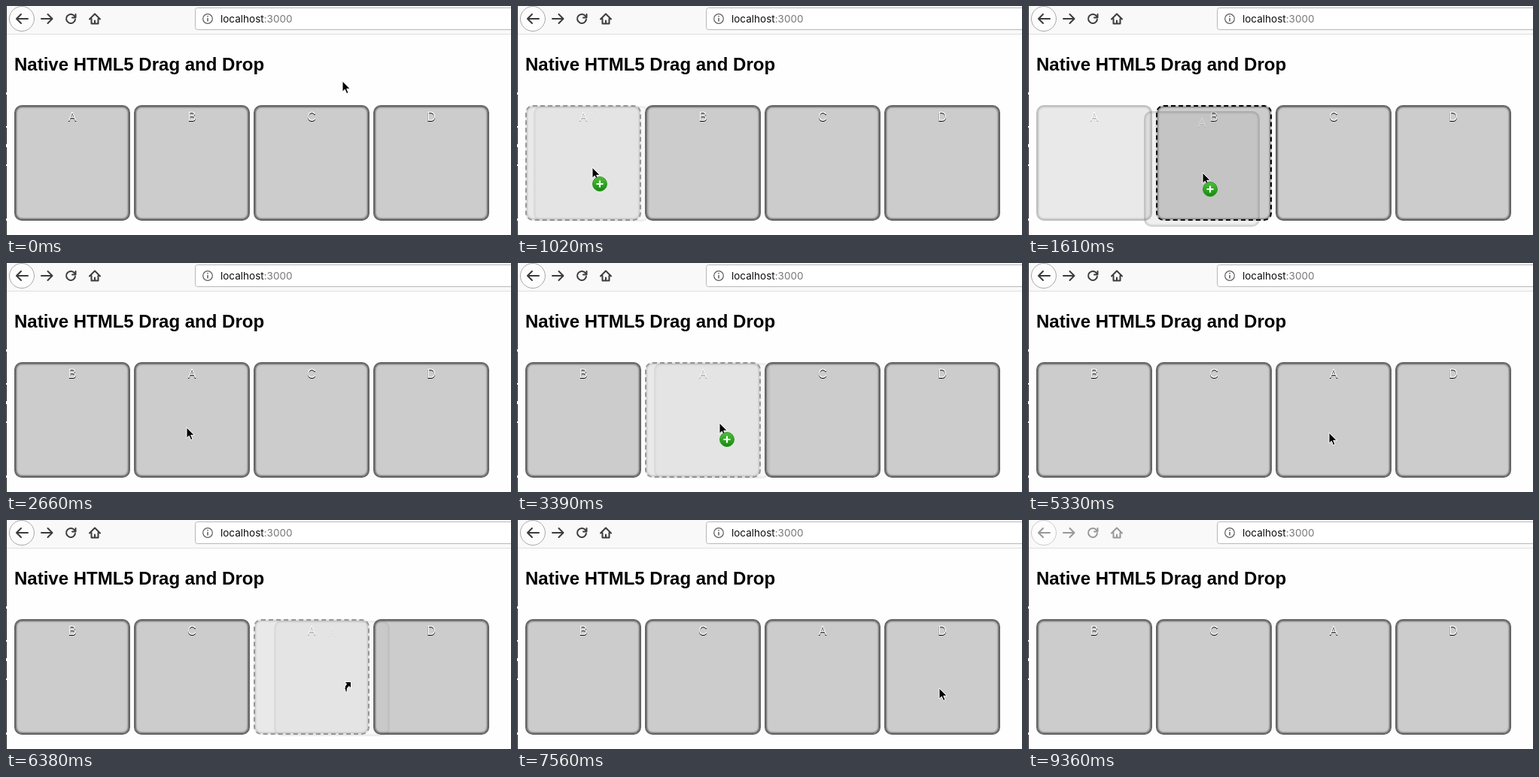
These frames come from a looping animation (671 px wide and 305 px high, 9.46 s). An HTML page:

```html
<!DOCTYPE html>
<html lang="en">
<head>
<meta charset="utf-8">
<title>Drag and drop</title>
<style>
  html, body { margin: 0; width: 100%; height: 100%; overflow: hidden; background: #fefefe; }
  svg { position: absolute; left: 0; top: 0; }
  .title { font: bold 24px "Liberation Sans", Arial, sans-serif; }
  .url { font: 13.5px Inter, sans-serif; fill: #0c0c0d; }
  .icons { fill: none; stroke: #3b3b3d; stroke-width: 2; stroke-linecap: round; stroke-linejoin: round; }
  .icons .ring { stroke: #a9a9ab; stroke-width: 1; fill: #fdfdfd; }
  .inactive .icons { stroke: #98989a; }
  .inactive .icons .ring { stroke: #cbcbcc; }
  .box {
    position: absolute; top: 132px; width: 154px; height: 154px; box-sizing: border-box;
    padding-top: 5px; border: 2px solid #666; border-radius: 10px;
    background: #ccc; box-shadow: inset 0 0 3px #000;
    font: 16px/18px "Liberation Sans", Arial, sans-serif; text-align: center;
    color: #fff; text-shadow: 0 1px #000;
  }
  .dim { opacity: .4; }
  .over { border: 2px dashed #000; }
  .ghost {
    background: rgba(150, 150, 150, .13); border-color: rgba(60, 60, 60, .16);
    box-shadow: inset 0 0 3px rgba(0, 0, 0, .2);
    color: rgba(255, 255, 255, .4); text-shadow: 0 1px rgba(0, 0, 0, .1);
  }
</style>
</head>
<body>
<svg width="671" height="305">
  <rect width="671" height="37" fill="#f9f9fa"/>
  <path d="M0 37.5H671" stroke="#e0e0e1"/>
  <rect x="251.5" y="2.5" width="440" height="29" rx="3" fill="#fff" stroke="#b8b8ba"/>
  <g class="icons">
    <circle class="ring" cx="21" cy="17" r="16.5"/>
    <path d="M29 17H14M20 11L14 17L20 23"/>
    <path d="M47 17H61M55.5 11L61.5 17L55.5 23"/>
    <path d="M91 13.5A6 6 0 1 0 92 18M92.5 11V15.5H88"/>
    <path d="M111 17.5L118 10.5L125 17.5M113.5 17V23.5H122.5V17M118 23V19.5"/>
  </g>
  <g fill="none" stroke="#5c5c5e">
    <circle cx="268" cy="17" r="6.3" stroke-width="1.2"/>
    <path d="M268 16V20.5M268 13V14.5" stroke-width="1.5"/>
  </g>
  <text class="url" x="285" y="22">localhost<tspan fill="#77777a">:3000</tspan></text>
  <text class="title" x="11" y="86">Native HTML5 Drag and Drop</text>
  <path d="M.5 0V305" stroke="#2a2a2c" stroke-dasharray="115 3 42 2 22 4 23 2 70 3"/>
</svg>
<div id="boxes"></div>
<svg width="671" height="305">
  <g id="cursor" stroke="#fff" stroke-linejoin="round">
    <path id="arrow" d="M0 0V14.2L3.3 11.2L5.6 16.6L8 15.6L5.7 10.3H10.2Z"/>
    <path id="link" d="M4 -1.5H12.5V7L9.8 4.5Q6 7 7.5 13.5Q1 7.5 6.6 1.4Z"/>
    <g id="plus">
      <circle cx="10" cy="22" r="9.5" fill="url(#green)" stroke="#1c8a12" stroke-width=".8"/>
      <path d="M5.5 22H14.5M10 17.5V26.5" stroke-width="2.2"/>
    </g>
  </g>
  <linearGradient id="green" x2="0" y2="1">
    <stop stop-color="#4fc03c"/><stop offset="1" stop-color="#138c0b"/>
  </linearGradient>
</svg>
<script>
const LOOP = 9460, STEP = 145, LEFT = 11, PITCH = 159;
const $ = id => document.getElementById(id);

// Each move goes from the last resting point to (x, y), through the fractions in p.
const moves = [
  { at: 0, x: 447, y: 100, p: [1] },
  { at: 140, x: 89, y: 214, p: [.25, .8, 1.053, 1] },
  { at: 1020, x: 232, y: 222, p: [.08, .3, .62, .88, 1] },
  { at: 2660, x: 257, y: 212, p: [.3, .8, 1] },
  { at: 3390, x: 400, y: 226, p: [.085, .3, .62, .88, 1] },
  { at: 5630, x: 419, y: 215, p: [.3, .8, 1] },
  { at: 6380, x: 561, y: 224, p: [.19, .5, .83, 1] },
  { at: 8610, x: 585, y: 264, p: [1] }
];
const drags = [
  { from: 1020, drop: 2210, end: 2210, slot: 0 },
  { from: 3390, drop: 5330, end: 5330, slot: 1 },
  { from: 6380, drop: 7270, end: 7560, slot: 2, rejected: true }
];

function addBox(cls) {
  const el = document.createElement("div");
  el.className = cls;
  return $("boxes").appendChild(el);
}
const boxes = [0, 1, 2, 3].map(i => {
  const el = addBox("box");
  el.style.left = LEFT + i * PITCH + "px";
  return el;
});
const ghost = addBox("box ghost");
ghost.textContent = "A";

function pointer(t) {
  const n = moves.findLastIndex(m => t >= m.at);
  const m = moves[n], start = moves[n - 1] || m;
  const step = Math.min(m.p.length - 1, Math.floor((t - m.at) / STEP));
  const p = m.p[step];
  return {
    step, start,
    x: start.x + (m.x - start.x) * p,
    y: start.y + (m.y - start.y) * Math.min(p, 1)
  };
}

function draw(t) {
  const mouse = pointer(t);
  const drag = drags.find(d => t >= d.from && t < d.end);
  const held = drag && t < drag.drop;
  const over = held ? Math.floor((mouse.x - LEFT) / PITCH) : -1;
  const order = t < 2210 ? "ABCD" : t < 5330 ? "BACD" : "BCAD";

  boxes.forEach((el, i) => {
    el.textContent = order[i];
    el.classList.toggle("dim", !!drag && drag.slot === i);
    el.classList.toggle("over", over === i);
  });

  ghost.hidden = !drag;
  ghost.style.display = drag ? "" : "none";
  if (drag) {
    // A rejected drop sends the ghost back to its slot.
    const back = held ? 1 : t - drag.drop < STEP ? .6 : .15;
    const dx = (mouse.x - mouse.start.x) * back;
    const dy = (mouse.y - mouse.start.y) * back;
    ghost.style.left = LEFT + drag.slot * PITCH + "px";
    ghost.style.transform = `translate(${Math.round(dx)}px, ${Math.round(dy)}px)`;
    ghost.style.opacity = Math.min(1, .4 + .2 * mouse.step) * back;
  }

  const show = (id, on) => $(id).setAttribute("display", on ? "inline" : "none");
  const linking = held && drag.rejected;
  show("cursor", t < 8760);
  show("arrow", !linking);
  show("link", linking);
  show("plus", held && !linking);
  $("cursor").setAttribute("transform", `translate(${Math.round(mouse.x)} ${Math.round(mouse.y)})`);
  document.body.classList.toggle("inactive", t >= 9360);
}

function tick() {
  draw(performance.now() % LOOP);
  requestAnimationFrame(tick);
}
tick();
</script>
</body>
</html>
```
